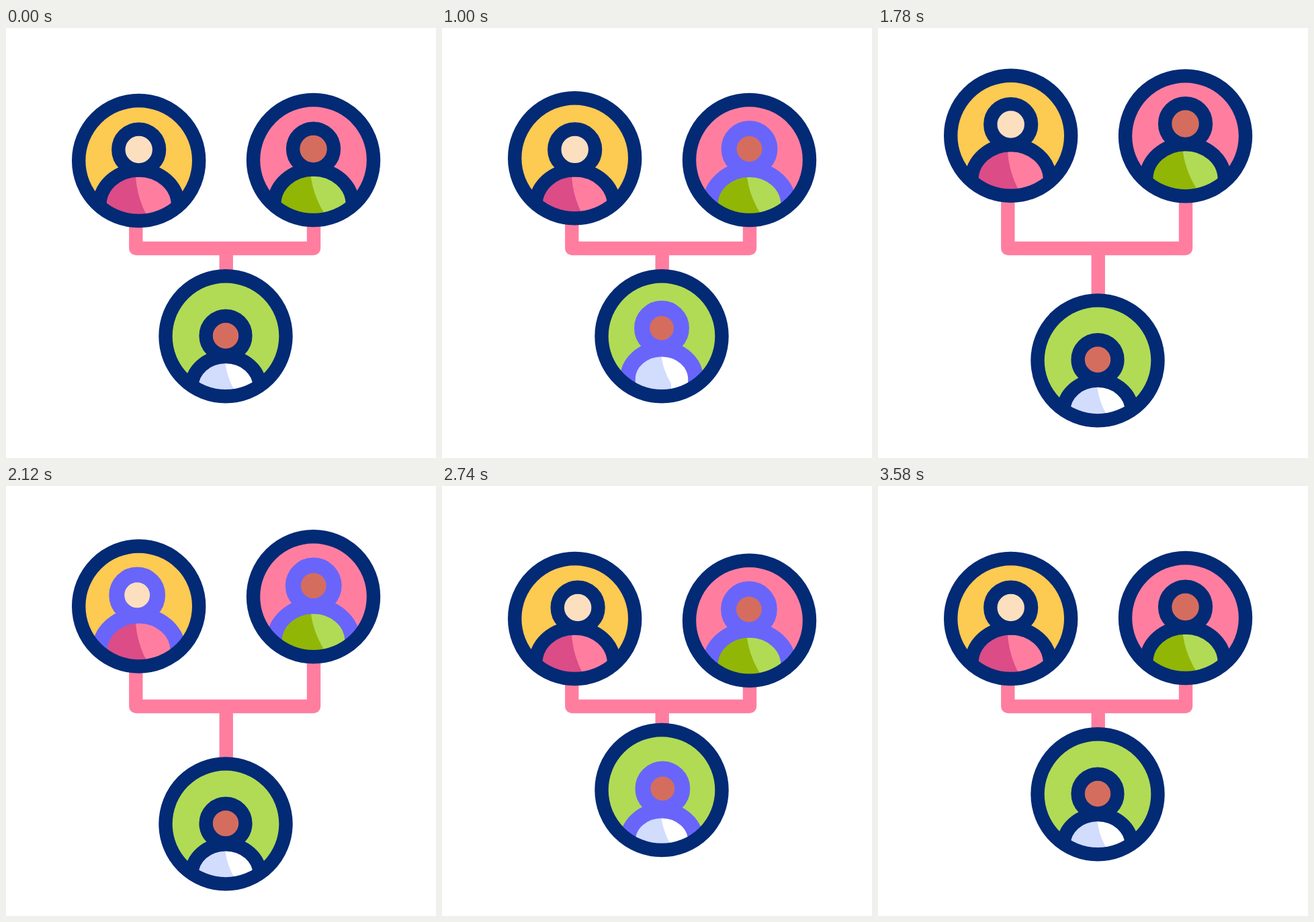
An HTML page for the animation above (3.6 s loop, 640 px wide and 640 px high).

```html
<!DOCTYPE html>
<html lang="en">
<head>
<meta charset="utf-8">
<title>Family tree</title>
<style>
  html, body { margin: 0; width: 100%; height: 100%; overflow: hidden; background: #fff; }
  svg { display: block; width: 100vw; height: 100vh; }
</style>
</head>
<body>
<svg id="stage" viewBox="0 0 640 640">
  <defs><clipPath id="disc"><circle r="89.5"/></clipPath></defs>
  <path d="M193.3 200V328H458V200M327.7 328V460" fill="none" stroke="#ff7ea0"
        stroke-width="20.4" stroke-linejoin="round"/>
</svg>
<script>
const LOOP = 3600, NAVY = '#032a75', PURPLE = '#6965fa', LINE = 20.4, WIDE = 23;
const stage = document.getElementById('stage');

// Progress from a to b, limited to 0..1, and the easings built on it.
const part = (t, a, b) => Math.min(1, Math.max(0, (t - a) / (b - a)));
const easeOut = (t, a, b) => 1 - (1 - part(t, a, b)) ** 2;
const easeInOut = (t, a, b) => (1 - Math.cos(Math.PI * part(t, a, b))) / 2;
const bump = (t, { from, to, by }) => by * Math.sin(Math.PI * part(t, from, to)) ** 2;
const swing = (t, { from, half, waves, by }) =>
  by * Math.sin(Math.PI * waves * part(t, from, from + half * waves));

// Away from rest, back past it, then settle.
const travel = (t, m) => m.by * easeOut(t, m.start, m.peak)
  + (m.over - m.by) * easeInOut(t, m.peak, m.back)
  - m.over * easeInOut(t, m.back, m.rest);

// The figure starts later than its ring but rises faster.
const lead = (t, m) => m.figure
  ? m.by * (easeOut(t, ...m.figure) - easeOut(t, m.start, m.peak)) : 0;

const lift = delay => ({
  start: 955 + delay, peak: 1850 + delay, back: 2460 + delay, rest: 2740 + delay,
  by: -37.5, over: 8.4, figure: [1000 + delay, 1600 + delay]
});
const parent = { headY: -16.5, headR: 30.4, rx: 58.3, ry: 52, top: 14, splitX: -5 };
const child = { headY: -.7, headR: 29.4, rx: 50.7, ry: 45, top: 30.4, splitX: -1 };

const people = [
  { ...parent, x: 197.7, y: 197.5, split: 'Q-5 50 12 82',
    bg: '#fdca52', skin: '#fcdfbf', dark: '#dc4c87', light: '#ff7ea0',
    move: lift(0),
    pop: { from: 60, to: 560, by: -8.5 },
    sway: { from: 2030, half: 510, waves: 3, by: -4.7 },
    purple: [[100, 660], [1960, 2580]] },
  { ...parent, x: 457.5, y: 196.5, split: 'Q-2 52 18 82',
    bg: '#ff7ea0', skin: '#d56d5e', dark: '#92b606', light: '#b1db55',
    move: lift(130),
    pop: { from: 140, to: 820, by: -7 },
    sway: { from: 2110, half: 600, waves: 2, by: 3.6 },
    nod: { from: 2700, to: 3580, by: -6.5 },
    purple: [[220, 1060], [2060, 2900]] },
  { ...child, x: 327, y: 458.7, split: 'Q-1 57 14 82',
    bg: '#b1db55', skin: '#d56d5e', dark: '#d2dcfd', light: '#fff',
    move: { start: 1240, peak: 2190, back: 2640, rest: 3000, by: 44.4, over: -7.5 },
    pop: { from: 300, to: 1900, by: -11.8 },
    sway: { from: 2200, half: 800, waves: 1, by: 1.6 },
    nod: { from: 2400, to: 3560, by: -2.2 },
    purple: [[500, 1260], [2560, 3340]] }
];

function add(parentEl, tag, attrs = {}) {
  const el = document.createElementNS('http://www.w3.org/2000/svg', tag);
  for (const k in attrs) el.setAttribute(k, attrs[k]);
  return parentEl.appendChild(el);
}

const shift = (el, x, y) => el.setAttribute('transform', `translate(${x.toFixed(3)} ${y.toFixed(3)})`);

function build(p) {
  const { rx, ry, top } = p;
  const side = `M${-rx} 160V${top + ry}A${rx} ${ry} 0 0 1 `;
  const body = `${side}${rx} ${top + ry}V160Z`;
  p.root = add(stage, 'g');
  add(p.root, 'circle', { r: 89.5, fill: p.bg });
  p.figure = add(add(p.root, 'g', { 'clip-path': 'url(#disc)' }), 'g');
  add(p.figure, 'path', { d: body, fill: p.light, stroke: 'none' });
  add(p.figure, 'path', { d: `${side}${p.splitX} ${top}${p.split}V160Z`, fill: p.dark, stroke: 'none' });
  add(p.figure, 'path', { d: body, fill: 'none' });
  p.face = add(p.figure, 'circle', { r: p.headR, fill: p.skin });
  add(p.root, 'circle', { r: 89.5, fill: 'none', stroke: NAVY, 'stroke-width': LINE });
}

function draw(t) {
  for (const p of people) {
    const lit = p.purple.some(([from, to]) => t >= from && t < to);
    shift(p.root, p.x, p.y + travel(t, p.move));
    shift(p.figure, 0, bump(t, p.pop) + lead(t, p.move));
    shift(p.face, swing(t, p.sway), p.headY + (p.nod ? bump(t, p.nod) : 0));
    p.figure.setAttribute('stroke', lit ? PURPLE : NAVY);
    p.figure.setAttribute('stroke-width', lit ? WIDE : LINE);
  }
}

people.forEach(build);
const start = performance.now();
function tick() {
  draw((performance.now() - start) % LOOP);
  requestAnimationFrame(tick);
}
tick();
</script>
</body>
</html>
```
